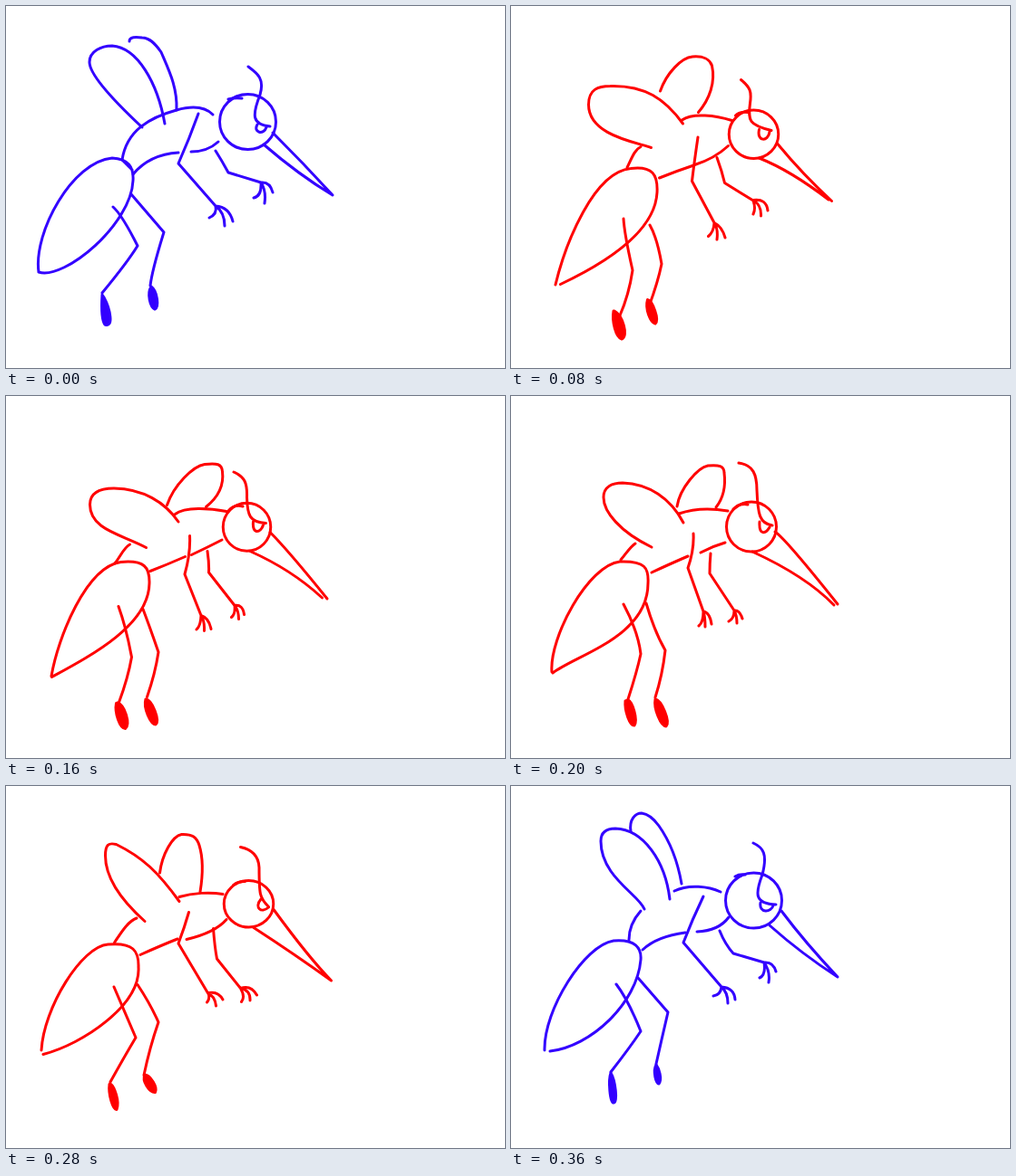
An HTML page without scripts that plays this animation: 550 by 400 pixels, repeating every 400 ms.

```html
<!DOCTYPE html>
<html lang="en">
<head>
<meta charset="utf-8">
<title>Hovering mosquito</title>
<style>
html, body { margin: 0; width: 100%; height: 100%; overflow: hidden; background: #fff; }
svg {
  display: block; width: 550px; height: 400px;
  fill: none; stroke: currentColor; stroke-width: 3;
  stroke-linecap: round; stroke-linejoin: round;
  animation: ink .4s step-end infinite;
}
svg > * { animation: .4s step-end infinite; }
.near-wing { animation-name: near-wing; }
.far-wing { animation-name: far-wing; }
.back { animation-name: back; }
.belly { animation-name: belly; }
.abdomen { animation-name: abdomen; }
.head { animation-name: head; }
.face { animation-name: face; }
.beak { animation-name: beak; }
.near-arm { animation-name: near-arm; }
.far-arm { animation-name: far-arm; }
.legs { animation-name: legs; }
.feet { animation-name: feet; fill: currentColor; }

/* Each pose holds 40 ms; steps(2) adds a halfway pose before the next one. */
@keyframes ink {
  0%, 90%, 100% { color: #30f; }
  10% { color: #f00; }
}
@keyframes near-wing {
  0% { d: path("M150 134C118 104 92 75 92 62C92 50 105 44 117 44C145 46 167 85 175 130"); }
  10% { d: path("M155 145C140 145 88 118 88 90C88 73 95 69 104 69C145 67 164 83 189 122"); animation-timing-function: steps(2); }
  30% { d: path("M154 168C136 156 83 168 83 128C83 111 97 108 115 108C150 108 175 122 190 138"); animation-timing-function: steps(2); }
  50% { d: path("M155 167C120 150 102 128 102 112C102 100 112 96 123 96C152 97 176 113 190 140"); }
  60% { d: path("M152 159C128 138 105 110 105 86C105 77 107 75 115 75C150 76 163 104 191 131"); animation-timing-function: steps(2); }
  80% { d: path("M154 140C130 118 114 95 114 68C114 52 119 50 128 54C152 82 172 86 191 124"); }
  90% { d: path("M147 136C141 120 99 100 99 61C99 50 106 47 115 47C146 48 170 83 175 125"); }
}
@keyframes far-wing {
  0% { d: path("M136 39C136 34 143 34 150 35C158 35 164 41 171 51C180 72 189 90 188 115"); }
  10% { d: path("M157 69C159 53 170 38 179 38C188 38 198 45 201 50C207 70 205 95 198 113"); animation-timing-function: steps(2); }
  30% { d: path("M172 119C184 95 206 76 221 74C236 72 241 73 242 82C244 98 233 111 215 122"); animation-timing-function: steps(2); }
  50% { d: path("M183 122C186 102 206 79 217 77C229 76 235 77 235 85C237 101 233 114 226 123"); }
  60% { d: path("M177 111C184 93 200 69 210 66C223 65 228 66 230 76C233 90 226 105 221 121"); animation-timing-function: steps(2); }
  80% { d: path("M162 81C160 59 166 42 177 41C187 41 192 46 196 55C202 70 208 92 207 113"); }
  90% { d: path("M132 50C130 37 137 30 144 30C152 31 158 37 163 44C175 61 184 85 188 108"); }
}
@keyframes back {
  0% { d: path("M228 120C218 110 202 111 188 115M188 115C159 123 133 137 128 170"); }
  10% { d: path("M240 125C224 118 208 115 189 121M150 146C143 150 140 158 137 168"); animation-timing-function: steps(2); }
  30% { d: path("M247 128C228 124 192 120 188 131M136 165C129 168 126 179 119 189"); animation-timing-function: steps(2); }
  50% { d: path("M239 127C222 124 202 124 185 130M137 163C131 167 127 174 121 181"); }
  60% { d: path("M244 122C228 118 204 116 188 123M142 152C133 157 125 168 117 179"); animation-timing-function: steps(2); }
  80% { d: path("M234 117C222 116 208 120 194 122M146 140C136 142 130 154 122 167"); }
  90% { d: path("M231 117C218 111 196 108 180 116M143 138C135 147 130 158 130 170"); }
}
@keyframes belly {
  0% { d: path("M140 186Q158 164 190 162M204 161Q222 161 234 150"); }
  10% { d: path("M164 188Q182 179 203 174M205 173Q228 168 239 153"); animation-timing-function: steps(2); }
  30% { d: path("M163 192Q182 186 200 178M200 178Q221 169 240 156"); animation-timing-function: steps(2); }
  50% { d: path("M155 195Q172 187 195 177M209 173Q222 166 236 162"); }
  60% { d: path("M148 192Q178 184 191 173M204 169Q235 159 243 150"); animation-timing-function: steps(2); }
  80% { d: path("M148 181Q167 167 187 165M194 170Q226 165 243 145"); }
  90% { d: path("M145 181Q161 166 192 162M205 161Q229 160 240 145"); }
}
@keyframes abdomen {
  0% { d: path("M36 294C30 250 73 172 117 168C135 169 141 178 140 193C138 241 65 303 36 294M128 170L139 181"); }
  10% { d: path("M43 302C47 260 90 176 131 175C154 173 159 184 157 205C154 253 108 273 54 300"); animation-timing-function: steps(2); }
  30% { d: path("M55 314C73 265 92 191 133 184C158 180 165 189 165 207C164 240 117 287 55 315"); animation-timing-function: steps(2); }
  50% { d: path("M45 305C42 267 85 187 120 183C148 182 152 190 151 207C151 266 72 286 46 306"); }
  60% { d: path("M40 298C38 252 83 181 109 180C138 178 148 186 148 205C152 244 92 289 41 303"); animation-timing-function: steps(2); }
  80% { d: path("M38 286C45 238 84 173 116 170C143 167 145 179 144 195C145 240 78 281 41 290"); }
  90% { d: path("M37 292C36 247 81 176 113 171C137 169 144 179 143 192C139 240 88 288 43 293"); }
}
@keyframes head {
  0% { cx: 266.5px; cy: 128px; rx: 31px; ry: 30.5px; }
  10% { cx: 269px; cy: 138.5px; rx: 29.5px; ry: 28px; animation-timing-function: steps(2); }
  30% { cx: 266px; cy: 145px; rx: 25px; ry: 25.5px; animation-timing-function: steps(2); }
  50% { cx: 265px; cy: 144.5px; rx: 27.5px; ry: 27.5px; }
  60% { cx: 267px; cy: 135.5px; rx: 25.5px; ry: 26px; animation-timing-function: steps(2); }
  80% { cx: 268px; cy: 125px; rx: 29px; ry: 25.5px; }
  90% { cx: 267.5px; cy: 126.5px; rx: 31px; ry: 30.5px; }
}
/* Brow flick, antenna, eye */
@keyframes face {
  0% { d: path("M245 103Q252 101 260 102M267 67C278 75 285 81 280 98C271 121 271 131 291 133M277 131C272 140 284 143 287 134"); }
  10% { d: path("M249 114Q254 111 262 111M256 69C267 77 270 82 267 95C262 121 262 125 289 137M276 134C272 148 286 150 288 138"); animation-timing-function: steps(2); }
  30% { d: path("M246 128Q251 121 261 124M251 94C260 103 261 106 260 120C260 133 263 138 285 138M271 139C269 152 281 151 282 140"); animation-timing-function: steps(2); }
  50% { d: path("M245 125Q252 118 261 120M251 74C267 76 271 87 271 104C272 131 274 141 288 143M274 139C273 155 281 152 285 145"); }
  60% { d: path("M252 114Q257 109 265 111M255 69C265 69 280 82 279 94C278 128 276 131 288 139M279 133C272 144 279 148 288 140"); animation-timing-function: steps(2); }
  80% { d: path("M249 105Q254 101 262 100M262 66C275 71 277 72 279 86C280 112 283 117 291 128M283 117C275 124 283 135 291 128"); }
  90% { d: path("M247 100Q252 97 258 98M267 63C278 68 283 75 277 98C269 119 268 130 292 131M275 129C273 141 287 140 289 132"); }
}
@keyframes beak {
  0% { d: path("M294 140Q328 174 360 209M360 209Q322 186 284 153"); }
  10% { d: path("M296 153Q323 188 359 213M359 213Q312 179 275 165"); animation-timing-function: steps(2); }
  30% { d: path("M291 151Q320 184 348 218M341 215Q305 185 272 171"); animation-timing-function: steps(2); }
  50% { d: path("M291 150Q302 157 360 230M356 231Q325 199 266 172"); }
  60% { d: path("M294 139Q327 181 360 221M360 221Q318 193 273 161"); animation-timing-function: steps(2); }
  80% { d: path("M296 134Q341 199 357 209M357 209Q320 180 273 152"); }
  90% { d: path("M298 138Q325 174 360 211M360 211Q321 186 285 154"); }
}
/* Thigh, shin, three claws */
@keyframes near-arm {
  0% { d: path("M212 119Q202 147 190 174L231 221Q233 230 224 234M231 221Q241 228 241 243M231 221Q246 222 250 238"); }
  10% { d: path("M208 133Q199 167 200 183L230 232Q230 241 222 247M230 232Q233 240 231 252M230 232Q237 236 241 249"); animation-timing-function: steps(2); }
  30% { d: path("M204 157Q205 178 199 204L218 247Q217 258 213 262M218 247Q224 253 223 264M218 247Q228 251 231 263"); animation-timing-function: steps(2); }
  50% { d: path("M201 152Q202 170 195 190L212 238Q212 250 207 254M212 238Q214 244 214 255M212 238Q219 239 221 252"); }
  60% { d: path("M202 142Q199 160 193 177L217 231Q217 238 213 240M217 231Q227 235 227 249M217 231Q230 226 237 238"); animation-timing-function: steps(2); }
  80% { d: path("M201 137Q194 154 187 171L230 230Q232 233 230 238M230 230Q233 228 236 237M230 226Q238 227 241 234"); }
  90% { d: path("M212 122Q200 147 190 173L232 222Q231 231 223 232M232 222Q239 228 239 240M232 222Q246 223 247 236"); }
}
@keyframes far-arm {
  0% { d: path("M231 160Q238 171 245 184L281 195Q282 210 273 212M281 195Q287 204 285 218M281 195Q291 194 294 206"); }
  10% { d: path("M230 166Q236 180 243 197L276 204Q280 212 277 220M276 204Q288 208 287 222M276 203Q293 201 296 215"); animation-timing-function: steps(2); }
  30% { d: path("M224 169Q229 185 228 194L258 226Q260 236 257 240M258 226Q264 231 264 242M258 226Q270 224 270 237"); animation-timing-function: steps(2); }
  50% { d: path("M220 174Q219 185 219 196L246 237Q246 246 240 249M246 237Q249 243 249 251M246 237Q252 236 255 246"); }
  60% { d: path("M226 162Q226 180 226 195L252 233Q255 243 250 245M252 233Q260 236 259 247M252 233Q263 230 267 242"); animation-timing-function: steps(2); }
  80% { d: path("M231 153Q234 176 239 187L265 214Q273 223 269 232M265 214Q279 215 279 227M265 214Q277 209 286 220"); }
  90% { d: path("M230 160Q236 175 245 185L279 195Q281 209 274 212M279 195Q286 205 284 217M279 195Q289 194 292 205"); }
}
@keyframes legs {
  0% { d: path("M118 222Q128 231 145 265Q134 283 106 317M138 208L174 250Q161 292 159 309"); }
  10% { d: path("M119 232Q135 270 136 280Q130 294 110 330M152 233L164 255Q159 290 153 313"); animation-timing-function: steps(2); }
  30% { d: path("M124 235Q125 252 134 292Q130 319 120 342M153 242Q161 256 166 285Q162 305 152 332"); animation-timing-function: steps(2); }
  50% { d: path("M124 230Q140 260 143 285Q139 304 129 335M149 229Q158 260 170 281Q167 308 159 333"); }
  60% { d: path("M121 224Q131 251 140 281Q133 298 120 329M149 224Q162 245 169 270Q153 297 152 325"); animation-timing-function: steps(2); }
  80% { d: path("M117 220Q126 237 146 275Q128 300 110 325M141 215Q157 238 167 252Q164 280 152 314"); }
  90% { d: path("M116 219Q129 236 143 271Q131 289 110 316M140 212L173 250Q166 280 160 307"); }
}
@keyframes feet {
  0% { d: path("M106 319C105 335 106 348 109 352C119 356 115 335 108 322ZM160 310C155 318 159 333 164 335C169 333 167 315 160 310Z"); }
  10% { d: path("M109 332C108 345 111 362 117 365C125 362 118 338 111 332ZM152 314C150 325 153 338 159 341C164 337 156 316 152 314Z"); animation-timing-function: steps(2); }
  30% { d: path("M117 342C114 352 120 370 127 371C135 368 128 345 117 342ZM149 335C145 344 154 361 159 361C164 357 156 335 149 335Z"); animation-timing-function: steps(2); }
  50% { d: path("M126 337C125 348 131 365 136 364C140 358 134 338 129 336ZM159 335C157 345 165 365 171 365C176 360 166 336 159 335Z"); }
  60% { d: path("M118 332C117 342 122 360 126 359C131 352 123 332 118 332ZM153 327C151 337 160 348 166 346C169 341 160 327 153 327Z"); animation-timing-function: steps(2); }
  80% { d: path("M110 327C108 340 114 357 118 356C120 345 116 333 113 327ZM153 311C148 315 156 330 163 331C166 325 158 312 153 311Z"); }
  90% { d: path("M110 317C107 325 109 350 113 350C118 350 115 325 110 317ZM160 308C156 315 160 330 163 329C167 324 163 312 160 308Z"); }
}
</style>
</head>
<body>
<svg viewBox="0 0 550 400">
  <path class="far-wing"/>
  <path class="near-wing"/>
  <path class="back"/>
  <path class="belly"/>
  <path class="abdomen"/>
  <ellipse class="head"/>
  <path class="face"/>
  <path class="beak"/>
  <path class="near-arm"/>
  <path class="far-arm"/>
  <path class="legs"/>
  <path class="feet"/>
</svg>
</body>
</html>
```
